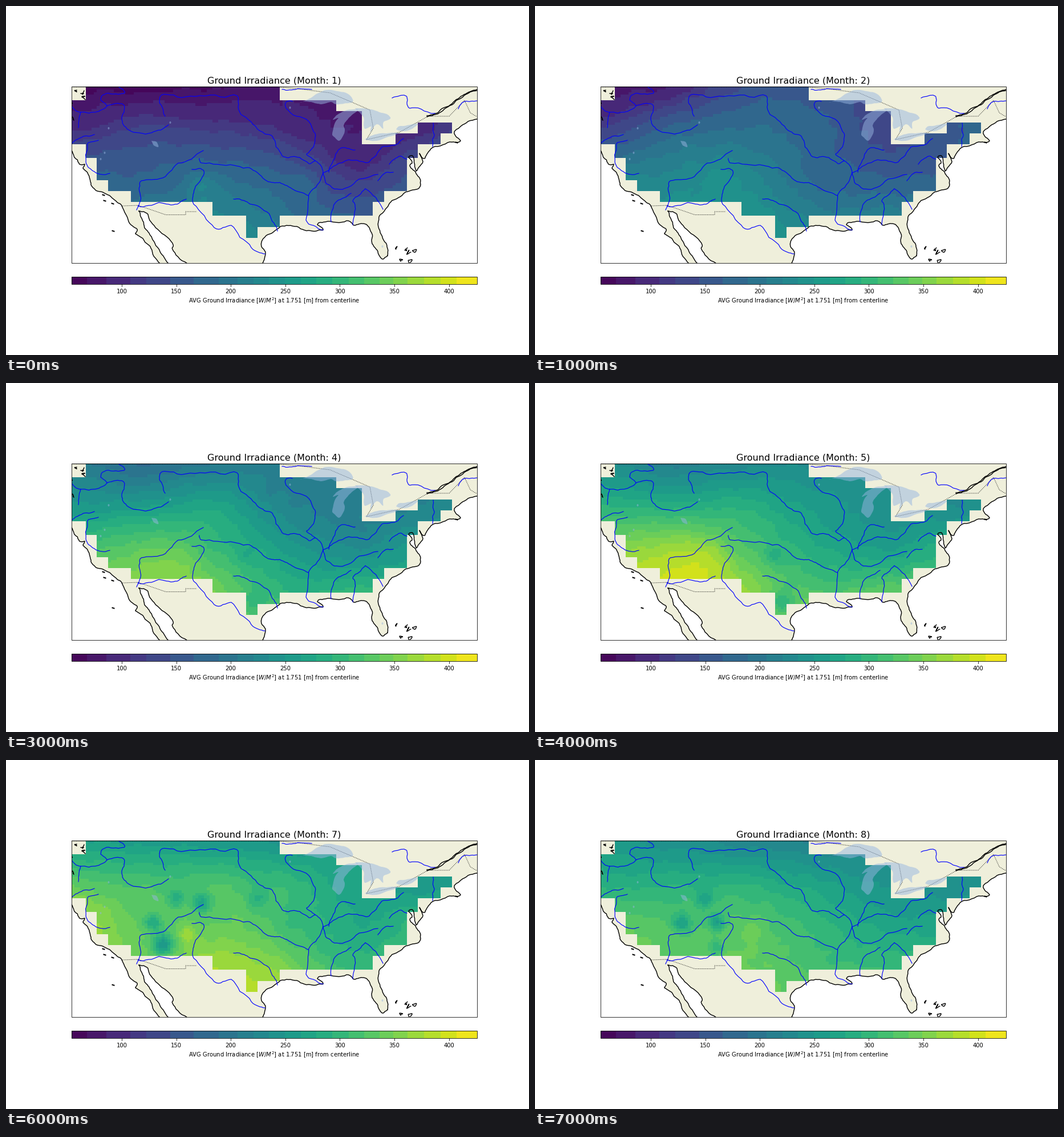
Recreate the animation shown at these times as a matplotlib script. Size 917 by 611 pixels, loop 8000 ms.

```python
import numpy as np
import matplotlib.pyplot as plt
from matplotlib.animation import FuncAnimation
from matplotlib.colors import BoundaryNorm, ListedColormap
from matplotlib.patches import Ellipse, Polygon, Rectangle

W, H = 917, 611
LEFT, RIGHT, TOP, BOTTOM = 115, 825.5, 141.5, 450
CELL_W, CELL_H, COLS, ROWS = 4.933, 4.81, 144, 55
LAND, WATER = "#efefdb", "#97b6e1"
rng = np.random.default_rng(4)

plt.rcParams["font.family"] = "DejaVu Sans"
fig = plt.figure(figsize=((W + 0.01) / 72, (H + 0.01) / 72), dpi=72, facecolor="white")
ax = fig.add_axes([0, 0, 1, 1])
ax.axis("off")
frame = Rectangle((LEFT, TOP), RIGHT - LEFT, BOTTOM - TOP, fill=False,
                  ec="black", lw=0.8, zorder=9)
ax.add_patch(frame)


def path(*xy):
    return np.array(xy, float).reshape(-1, 2)


def rough(pts, amount=0.1, levels=3):
    """Four-point curve subdivision with a random sideways wobble."""
    for _ in range(levels):
        p = np.vstack([2 * pts[0] - pts[1], pts, 2 * pts[-1] - pts[-2]])
        step = np.diff(pts, axis=0)
        normal = np.column_stack([-step[:, 1], step[:, 0]])
        mid = (9 * (p[1:-2] + p[2:-1]) - p[:-3] - p[3:]) / 16
        out = np.empty((2 * len(pts) - 1, 2))
        out[::2] = pts
        out[1::2] = mid + normal * rng.uniform(-amount, amount, (len(step), 1))
        pts = out
    return pts


def line(pts, color="black", lw=1.4, z=5, **kw):
    art, = ax.plot(*pts.T, color=color, lw=lw, zorder=z,
                   solid_joinstyle="round", **kw)
    art.set_clip_path(frame)


def area(pts, color, z, alpha=1):
    art = Polygon(pts, closed=True, fc=color, ec="none", alpha=alpha, zorder=z)
    ax.add_patch(art)
    art.set_clip_path(frame)


def river(*xy):
    line(rough(path(*xy)), "blue", 1.15, 6)


def lake(*xy):
    area(rough(path(*xy, *xy[:2]), 0.05), WATER, 4, 0.5)


def border(*xy):
    line(path(*xy), "black", 1, 4, ls=":")


# ---- land and coast ----
pacific = rough(path(
    115, 253, 125, 269, 129, 277, 138, 277, 135, 284, 143, 292, 149, 310, 160, 324,
    184, 334, 202, 348, 214, 374, 230, 391, 227, 399, 240, 407, 254, 424, 270, 451))
gulf_west = rough(path(285, 451, 270, 430, 257, 409, 246, 392, 241, 378, 233, 359))
gulf_east = rough(path(233, 359, 249, 365, 266, 391, 293, 418, 292, 426, 318, 451))
gulf = rough(path(
    449, 451, 455, 433, 448, 414, 456, 402, 481, 386, 510, 386, 537, 394, 556, 392,
    546, 383, 560, 378, 597, 376, 611, 384, 627, 381, 641, 397, 641, 411, 652, 430,
    660, 443, 669, 437))
atlantic = rough(path(
    669, 437, 664, 413, 653, 387, 655, 367, 671, 348, 691, 334, 720, 321, 727, 312,
    721, 296, 708, 280, 712, 275, 706, 265, 714, 264, 719, 289, 731, 272, 725, 258,
    734, 267, 745, 250, 778, 238, 797, 236, 786, 221, 798, 210, 826, 198))
corners = path(827, 198, 827, 141, 114, 141, 114, 253)
coasts = [pacific, gulf_west, gulf_east, gulf, atlantic]
area(np.vstack(coasts + [corners]), LAND, 1)
for coast in coasts:
    line(coast)

estuary = path(826, 147, 803, 156, 782, 172, 757, 188, 738, 193)
for shift in (-1, 1):
    line(rough(estuary + [0, shift]))

# Small islands and inlets
for spot in path(124, 151, 134, 152, 136, 160, 116, 169, 116, 197, 686, 424, 703, 425,
                 706, 431, 716, 428, 693, 443, 708, 447):
    line(rough(spot + rng.uniform(-4, 4, (4, 2))))
for spot in path(171, 331, 173, 341, 187, 346, 188, 394, 790, 239):
    line(spot + [[-1.5, -0.5], [1.5, 0.5]], lw=2)

# ---- borders ----
border(115, 142, 480, 142, 520, 146, 568, 152, 638, 182, 644, 214, 632, 234,
       690, 221, 740, 193, 777, 193, 804, 165, 814, 187, 826, 194)
border(204, 350, 232, 349, 280, 365.5, 315, 365.5, 315, 360, 334, 360)

# ---- lakes ----
lake(515, 169, 540, 157, 562, 147, 596, 152, 608, 168, 579, 172, 570, 168, 553, 172, 535, 168)
lake(572, 226, 577, 204, 583, 196, 573, 199, 590, 185, 617, 182, 602, 195, 592, 209,
     594, 218, 584, 236)
lake(612, 179, 640, 181, 667, 189, 674, 197, 662, 203, 661, 215, 650, 207, 639, 221,
     640, 211, 629, 215, 627, 195)
lake(629, 234, 650, 236, 687, 223, 667, 223, 641, 227)
lake(684, 216, 705, 218, 722, 206, 692, 210)
lake(255, 236, 264, 238, 267, 247, 259, 244)
for spot in path(180, 214, 166, 268, 173, 257, 288, 204, 498, 178, 660, 421):
    ax.add_patch(Ellipse(spot, 3, 4, fc=WATER, alpha=0.5, zorder=4))

# ---- rivers ----
river(198, 142, 207, 153, 176, 153, 166, 165, 177, 175, 160, 185, 131, 186, 115, 176)
river(177, 175, 205, 172, 207, 186, 203, 197, 215, 217, 255, 222, 285, 208)
river(131, 186, 128, 200, 127, 213)
river(115, 241, 130, 231, 155, 225)
river(162, 235, 143, 241, 140, 273, 155, 290, 182, 293)
river(279, 193, 269, 169, 282, 155, 340, 157, 405, 157, 412, 190, 444, 218, 467, 228,
      484, 262, 508, 264, 531, 276, 542, 271)
river(484, 146, 500, 147, 536, 146)
river(502, 167, 490, 170, 500, 188, 536, 212, 541, 240, 527, 259, 542, 271, 556, 292,
      534, 325, 526, 375, 556, 392)
river(556, 292, 570, 284, 612, 270, 637, 273, 659, 247, 680, 244, 697, 232)
river(566, 291, 578, 259, 594, 248, 612, 252)
river(556, 292, 569, 315, 605, 315, 652, 295)
river(652, 306, 664, 293, 679, 291)
river(672, 277, 690, 263, 703, 268)
river(570, 378, 580, 342, 605, 328)
river(608, 383, 612, 348, 609, 339, 630, 320)
river(661, 356, 630, 320)
river(339, 267, 345, 275, 400, 279, 430, 285, 457, 306, 480, 309, 505, 322, 530, 332)
river(399, 338, 420, 342, 445, 352, 470, 380, 476, 394)
river(326, 286, 347, 289, 331, 320, 329, 347, 365, 388, 395, 384, 430, 423, 454, 434)
river(346, 253, 302, 275, 270, 302, 235, 308, 236, 340, 229, 357)
river(231, 350, 268, 344, 300, 347, 316, 338)
river(748, 246, 751, 225, 749, 205)
river(677, 161, 700, 157, 703, 168, 708, 179, 752, 188)
river(826, 166, 805, 167, 793, 180)

# ---- colour scale ----
px_per_unit = (776.5 - 203) / 300
edges = np.array([115, 142, 176, 218, 246, 288, 329, 373, 406, 434, 461, 489, 517, 544,
                  572, 601, 628, 655, 679, 704, 733, 762, 790, 825.5])
levels = 100 + (edges - 203) / px_per_unit
mids = (edges[:-1] + edges[1:]) / 2
cmap = ListedColormap(plt.get_cmap("viridis")((mids - LEFT) / (RIGHT - LEFT)))
norm = BoundaryNorm(levels, cmap.N)
ax.pcolormesh(edges, [474, 487.5], [(levels[:-1] + levels[1:]) / 2], cmap=cmap, norm=norm)
ax.add_patch(Rectangle((LEFT, 474), RIGHT - LEFT, 13.5, fill=False, ec="black", lw=0.8))
for value in range(100, 401, 50):
    x = 203 + (value - 100) * px_per_unit
    ax.plot([x, x], [487.5, 491], color="black", lw=0.8)
    ax.text(x, 494.5, str(value), size=10, ha="center", va="top")
ax.text(470, 520.5, "AVG Ground Irradiance [$W/M^2$] at 1.751 [m] from centerline",
        size=10, ha="center", va="baseline")
title = ax.text(470, 135.3, "", size=16, ha="center", va="baseline")

# ---- irradiance field: thin plate spline over a 6 x 4 lattice, plus local spots ----
gx, gy = np.meshgrid(LEFT + (np.arange(COLS) + 0.5) * CELL_W,
                     TOP + (np.arange(ROWS) + 0.5) * CELL_H)
kx, ky = np.meshgrid(np.linspace(115, 745, 6), np.linspace(150, 360, 4))
knots = np.column_stack([kx.ravel(), ky.ravel()]) / 100
cells = np.column_stack([gx.ravel(), gy.ravel()]) / 100


def basis(p):
    r2 = ((p[:, None] - knots) ** 2).sum(-1)
    return np.hstack([r2 * np.log(r2 + 1e-9), np.ones((len(p), 1)), p])


affine = np.column_stack([np.ones(len(knots)), knots])
system = np.vstack([basis(knots), np.hstack([affine.T, np.zeros((3, 3))])])
spline = basis(cells) @ np.linalg.inv(system)[:, :len(knots)]


def field(values, *spots):
    z = (spline @ np.array(values, float)).reshape(gx.shape)
    for x, y, gain, r in spots:
        z += gain * np.exp(-((gx - x) ** 2 + (gy - y) ** 2) / (2 * r * r))
    z += 3 * np.sin(gx / 11 + 2 * np.sin(gy / 17)) * np.sin(gy / 9 + np.sin(gx / 23))
    return z


jan = field([68, 67, 72, 82, 78, 92,
             105, 132, 122, 105, 85, 108,
             165, 165, 180, 162, 110, 170,
             185, 200, 222, 190, 162, 185], (345, 312, 25, 20), (525, 315, 20, 18))
feb = field([80, 95, 150, 155, 130, 155,
             125, 180, 193, 178, 138, 165,
             215, 222, 225, 180, 160, 170,
             230, 240, 245, 212, 212, 190], (330, 303, 12, 20))
mar = field([190, 165, 190, 197, 190, 200,
             215, 240, 260, 190, 188, 210,
             275, 298, 285, 238, 208, 228,
             305, 325, 328, 262, 262, 245], (460, 188, -22, 12))
may = field([245, 222, 235, 236, 235, 235,
             295, 290, 292, 260, 245, 235,
             350, 370, 325, 282, 262, 300,
             380, 400, 365, 320, 330, 325],
            (300, 312, 22, 28), (430, 388, -55, 18), (420, 303, -25, 11))
jul = field([272, 265, 258, 250, 262, 246,
             335, 320, 325, 305, 270, 255,
             382, 335, 338, 310, 280, 310,
             385, 345, 375, 350, 300, 330],
            (298, 243, -40, 11), (343, 250, -60, 12), (258, 285, -55, 10),
            (275, 323, -85, 13), (318, 306, 35, 9), (440, 245, -30, 12))
aug = field([262, 245, 232, 224, 230, 234,
             290, 292, 294, 272, 248, 240,
             345, 325, 328, 302, 272, 275,
             358, 335, 340, 315, 305, 300],
            (297, 244, -42, 10), (318, 285, -65, 10), (258, 286, -60, 11),
            (318, 328, -40, 9), (382, 298, 15, 14))
months = [jan, feb, mar, (mar + may) / 2, may, (may + jul) / 2 + 10, jul, aug]

# Covered cells: first row, last row, first column, last column
covered = np.zeros((ROWS, COLS), bool)
for r0, r1, c0, c1 in ((0, 5, 5, 74), (5, 9, 0, 94), (9, 21, 0, 103), (13, 17, 123, 135),
                       (17, 21, 115, 131), (21, 26, 5, 123), (26, 34, 9, 119),
                       (34, 38, 13, 119), (38, 42, 21, 111), (42, 47, 50, 107),
                       (47, 51, 62, 74), (51, 55, 62, 66)):
    covered[r0:r1, c0:c1] = True

extent = (LEFT, LEFT + COLS * CELL_W, TOP + ROWS * CELL_H, TOP)
mesh = ax.imshow(np.zeros((ROWS, COLS)), cmap=cmap, norm=norm, extent=extent,
                 aspect="auto", interpolation="nearest", zorder=3)
mesh.set_clip_path(frame)
ax.set_xlim(0, W)
ax.set_ylim(H, 0)


def draw(i):
    z = np.clip(months[i], levels[0] + 0.1, levels[-1] - 0.1)
    mesh.set_data(np.ma.array(z, mask=~covered))
    title.set_text(f"Ground Irradiance (Month: {i + 1})")
    return mesh, title


anim = FuncAnimation(fig, draw, frames=len(months), interval=1000, repeat=True)
plt.show()
```
